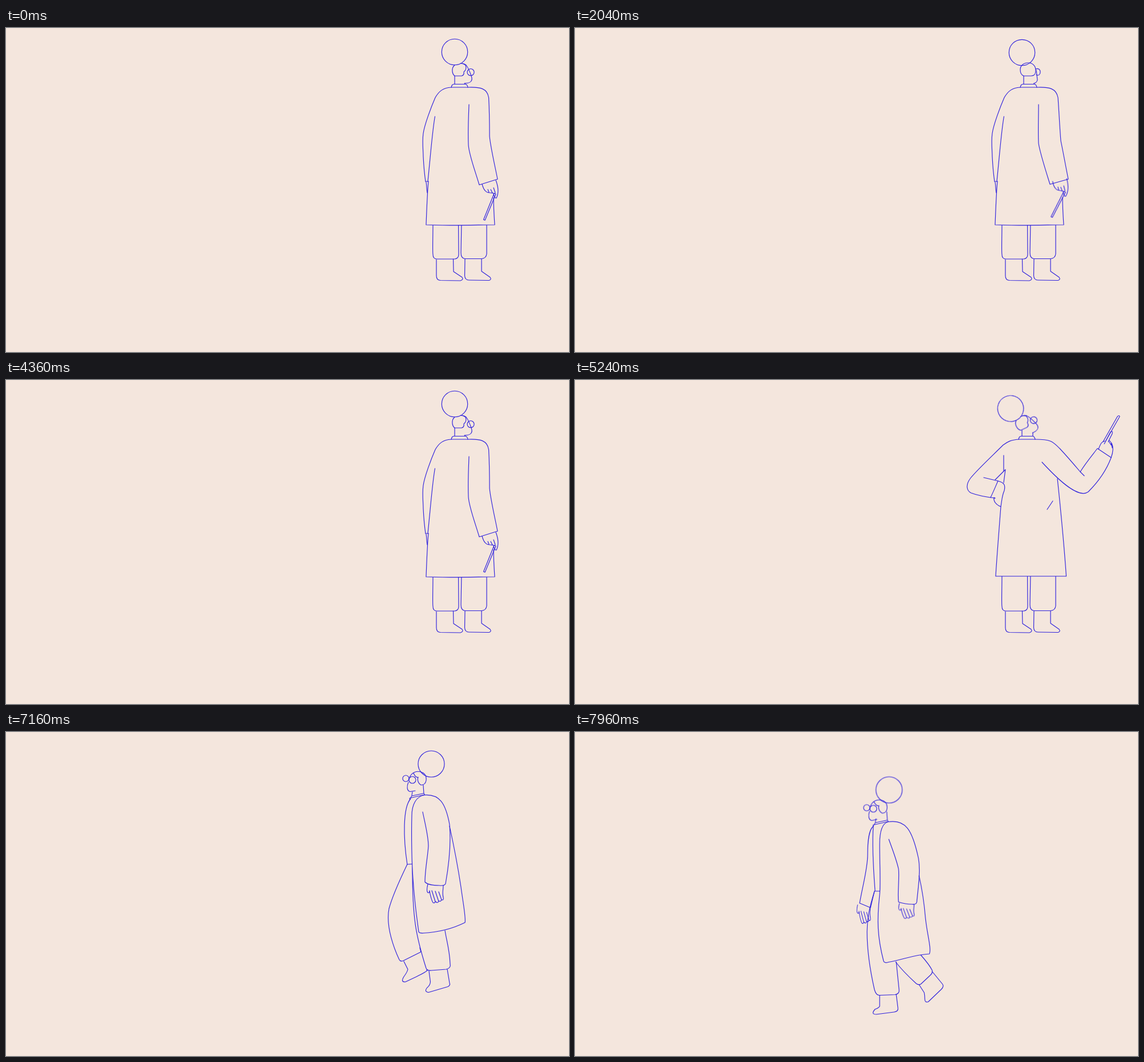
An HTML page without scripts for the animation above (8000 ms loop, 985 by 568 pixels).

```html
<!DOCTYPE html>
<html lang="en">
<head>
<meta charset="utf-8">
<title>Lecturer with a pointer</title>
<style>
html, body { margin: 0; width: 100%; height: 100%; overflow: hidden; background: #f4e6dd; }
svg { display: block; width: 985px; height: 568px; fill: none; stroke: #2f22dc; stroke-width: 1.15; stroke-linejoin: round; stroke-linecap: round; }
.solid { fill: #f4e6dd; }

/* one percent is one 80 ms drawing */
.move { animation: 8s steps(5) infinite; }
.walk { animation: 8s steps(6) infinite; }
.stride { animation: 8s steps(3) infinite; }
.swap { animation: 8s step-end infinite; }

/* visibility switches */
#back { animation-name: back-on; }
#side { animation-name: side-on; }
#look { animation-name: look-on; }
#away { animation-name: away-on; }
#left { animation-name: left-on; }
#low { animation-name: low-on; }
#high { animation-name: high-on; }
#pocket { animation-name: pocket-on; }
#armpit { animation-name: armpit-on; }
#knuckles { animation-name: knuckles-on; }
#far-arm { animation-name: far-arm-on; }
@keyframes back-on { 0% { opacity: 1 } 89.5%, 100% { opacity: 0 } }
@keyframes side-on { 0% { opacity: 0 } 89.5%, 100% { opacity: 1 } }
@keyframes look-on { 0%, 38.5% { opacity: 1 } 3.5%, 74.5%, 100% { opacity: 0 } }
@keyframes away-on { 0%, 38.5%, 100% { opacity: 0 } 3.5% { opacity: 1 } }
@keyframes left-on { 0% { opacity: 0 } 74.5%, 100% { opacity: 1 } }
@keyframes low-on { 0% { opacity: 1 } 60.5%, 100% { opacity: 0 } }
@keyframes high-on { 0% { opacity: 0 } 60.5%, 100% { opacity: 1 } }
@keyframes pocket-on { 0% { opacity: 0 } 62.5%, 100% { opacity: 1 } }
@keyframes armpit-on { 0%, 73.5%, 100% { opacity: 0 } 62.5% { opacity: 1 } }
@keyframes knuckles-on { 0% { opacity: 0 } 75.5%, 100% { opacity: 1 } }
@keyframes far-arm-on { 0% { opacity: 0 } 96.5%, 100% { opacity: 1 } }

/* figure seen from behind */
#turn { animation-name: turn; }
@keyframes turn {
  0%, 84.5% { transform: none }
  89.5%, 100% { transform: translate(-40px, 11px) }
}
#trouser-l { animation-name: trouser-l; }
@keyframes trouser-l {
  0%, 84.4% { d: path("M747 340C747 370 746 390 747 397Q747 405 754 405L785 405Q792 404 792 397L791.5 340") }
  84.5%, 100% { d: path("M744 346C746 372 748 392 754 399Q757 402 764 401L790 397.5Q798 396 797.5 388L792 342") }
}
#trouser-r { animation-name: trouser-r; }
@keyframes trouser-r {
  0%, 84.4% { d: path("M797 340L796 394Q796 404 803 404.5L832 404.5Q840 404 841 396L841 338") }
  84.5%, 100% { d: path("M799 340L798 393Q799 402 807 405L832 408Q840 407 842 402L847 338") }
}
#boot-l { animation-name: boot-l; }
@keyframes boot-l {
  0%, 84.4% { d: path("M753 406L753 434Q753 442 760 442.5L795 443Q801 441 798 437L783 427L782.5 405") }
  84.5%, 100% { d: path("M763 401L766 424Q770 441 777 443L792 443Q799 442 797 437L793 422L792 398") }
}
#boot-r { animation-name: boot-r; }
@keyframes boot-r {
  0%, 84.4% { d: path("M803 405L802.5 434Q803 442 810 442L845 442.5Q850 441 847 437L832 426.5L832 405") }
  84.5%, 100% { d: path("M806 406L804 434Q803 442 808 441.5L841 442Q846 441 843 437L833 427L835 408") }
}
#coat { animation-name: coat; }
@keyframes coat {
  0%, 55.5% { d: path("M739 269C737 290 736 320 735 345C770 347 830 345 855 345C854 330 853 310 853 297") }
  65.5%, 72.5% { d: path("M745 222C742 262 738 310 736 344C770 344 820 344 859.5 344C855 280 850 230 844 173") }
  75.5%, 100% { d: path("M742 240C740 270 731 325 738 348C780 348 815 342 858 340.5C861 320 845 235 836 173") }
}
#arm-l { animation-name: arm-l; }
@keyframes arm-l {
  0%, 55.5% { d: path("M779 104C765 105 758 110 751 122C744 138 732 170 730 185C728 200 730 215 730 225C731 245 732 255 734 269") }
  65.5%, 72.5% { d: path("M776 104C763 105 757 108 749 114C730 133 703 158 692 172C683 184 685 194 693 198C706 203 718 205 735 207") }
  75.5%, 100% { d: path("M768 108C750 110 743 115 737 122C718 145 706 170 700 186C696 198 701 204 706 209C715 217 720 221 727 221") }
}
#inner-l { animation-name: inner-l; }
@keyframes inner-l {
  0%, 55.5% { d: path("M750.5 155C746 180 744 210 738 269") }
  65.5%, 72.5% { d: path("M750 132C750 140 750 150 750 160") }
  75.5%, 100% { d: path("M753 155C748 165 743 177 739 190") }
}
#cuff-l { animation-name: cuff-l; }
@keyframes cuff-l {
  0%, 55.5% { d: path("M739 269C738 269 737 269 737 269C736 269 735 269 734 269") }
  65.5%, 72.5% { d: path("M715 171C723 173 732 175 740 177C736 186 732 196 727 206") }
  75.5%, 100% { d: path("M740 187C747 193 747 199 745 206C740 216 733 221 722 221") }
}
#hand-l { animation-name: hand-l; }
@keyframes hand-l {
  0%, 55.5% { d: path("M735 270C736 276 736 283 737 289C737 289 737 289 737 289C737 289 737 289 737 289C737 289 737 289 737 289") }
  65.5%, 72.5% { d: path("M740 177C752 180 753 185 751 194C747 203 747 210 745 222C737 219 732 213 733 206C733 206 734 207 735 207") }
  75.5%, 100% { d: path("M746 194C750 206 758 212 756 221C752 226 756 232 749 237C742 239 740 243 735 241C731 237 729 231 727 221") }
}
#arm-r { animation-name: arm-r; }
@keyframes arm-r {
  0%, 4.5%, 11.5%, 18.5%, 23.5%, 30.5%, 55.5% { d: path("M808 104C830 103 842 106 844.5 122C846 150 846 170 846 190C848 210 854 235 860 265L828 275C820 248 810 222 809 205C808 180 809 160 810 134") }
  6.5%, 13.5%, 25.5% { d: path("M808 104C830 103 842 106 845 122C847 150 848 175 850 198C854 217 858 240 863 265L831 274C822 245 813 217 811 202C810 180 811 160 811 134") }
  8.5%, 15.5%, 27.5% { d: path("M808 104C830 103 841 106 847 122C852 150 856 170 860 190C868 212 879 236 888 257L858 270C845 245 825 220 820 203C816 180 813 160 812 134") }
  60.5%, 89.5%, 100% { d: path("M807 104C832 104 840 108 847 124C856 145 865 165 872 180C884 192 897 200 909 208L893 236C878 228 862 218 850 208C838 195 820 170 814 140") }
  65.5%, 72.5% { d: path("M805 104C833 104 836 108 848 120C862 135 873 148 884 161C893 146 904 133 914 120L938 136C928 163 912 182 898 196C882 208 850 180 817 144") }
  75.5%, 84.5% { d: path("M795 105C822 102 826 107 836 116C850 130 862 141 872 151C885 139 900 127 912 117.5L931 137C918 155 903 170 892 183C874 206 848 192 825 157") }
}
#crease { animation-name: crease; }
@keyframes crease {
  0%, 60.5%, 89.5%, 100% { d: path("M872 180L876 184") }
  65.5%, 72.5% { d: path("M884 161L891 168") }
  75.5%, 84.5% { d: path("M872 151L878 158") }
}
#low-hand { animation-name: low-hand; transform-origin: 846px 270px; }
@keyframes low-hand {
  0%, 4.5%, 11.5%, 18.5%, 23.5%, 30.5%, 55.5% { transform: none }
  6.5%, 13.5%, 25.5% { transform: translate(3px, -4px) rotate(5deg) }
  8.5%, 15.5%, 27.5% { transform: translate(28px, -6px) rotate(-10deg) }
  60.5%, 100% { transform: translate(55px, -48px) rotate(-40deg) }
}
#high-hand { animation-name: high-hand; transform-origin: 926px 128px; }
@keyframes high-hand {
  0%, 60.5%, 89.5%, 100% { transform: translate(-25px, 94px) rotate(90deg) }
  65.5%, 72.5% { transform: none }
  75.5%, 84.5% { transform: translate(-3.5px, .5px) }
}
#collar { animation-name: collar; }
@keyframes collar {
  0%, 55.5% { d: path("M779 104L780 101Q781 98.5 784 98.5L804 98.5Q807 99 808 104Z") }
  65.5%, 72.5% { d: path("M776 104L777 101Q778 98.5 781 98.5L801 98.5Q804 99 805 104Z") }
  75.5%, 100% { d: path("M767 108L768 106Q768 103.5 771 103.5L791 101Q794 101 796 105Z") }
}
#neck { animation-name: neck; }
@keyframes neck {
  0%, 55.5% { d: path("M785 84L785 98M803 97L803 98") }
  65.5%, 72.5% { d: path("M782 88L782 98M801 92L801 98") }
  75.5%, 100% { d: path("M787 87L789 101M769 97L770 103") }
}
#head { animation-name: head; transform-origin: 793px 92px; }
@keyframes head {
  0%, 55.5% { transform: none }
  65.5%, 100% { transform: translate(-2.5px, 0) rotate(-25deg) }
}

/* figure walking to the left */
#approach { animation: approach 8s steps(4) infinite; }
@keyframes approach {
  0%, 89.5% { transform: translate(58px, -18px) }
  93.5%, 100% { transform: none }
}
#torso { animation-name: torso; }
@keyframes torso {
  0%, 93.5% { d: path("M650 135C636 150 637 205 644 250L652 249.5") }
  99.5%, 100% { d: path("M522 164C520 190 522 240 525 279L534 279") }
}
#robe { animation-name: robe; }
@keyframes robe {
  0%, 93.5% { d: path("M675 128.5C660 130 652 145 652 165C651 200 652 250 654 275C657 320 661 345 664 368Q665 371 672 370.5C700 369 725 362 745 352C747 345 742 320 738 290C732 250 725 215 718 183") }
  99.5%, 100% { d: path("M548 157.5C537 160 533 175 533 197C533 230 535 270 533 285C528 330 529 360 540 402Q542 406 548 403.5C575 399 590 391 620 389C624 380 616 355 613 325C611 300 607 275 602 252") }
}
#near-arm { animation-name: near-arm; }
@keyframes near-arm {
  0%, 93.5% { d: path("M675 128.5C700 127 711 142 718 180C721 215 717 250 711 284Q709 288 700 287C690 287 680 286 675 281C675 260 680 235 681 218C681 200 675 178 671 158") }
  99.5%, 100% { d: path("M548 157.5C578 153 590 170 601 222C605 245 600 275 598 298Q597 303 590 302C582 302 572 300 566 298C564 280 568 255 566 240C562 222 555 205 549 188") }
}
#near-hand { animation-name: near-hand; transform-origin: 693px 286px; }
@keyframes near-hand {
  0%, 93.5% { transform: none }
  99.5%, 100% { transform: translate(-113px, 15px) scale(.95, .82) }
}
#far-swing { animation-name: far-swing; }
@keyframes far-swing {
  0%, 93.5% { transform: translate(137px, -28px) }
  99.5%, 100% { transform: none }
}
#far-leg { animation-name: far-leg; }
@keyframes far-leg {
  0%, 93.5% { d: path("M644 250C632 275 618 305 612 328C606 360 622 400 630 417Q632 421 637 419L667 404Q668 403 667 400L666 396") }
  96.5% { d: path("M584 265C572 295 563 318 558 345C551 385 538 425 530 450Q529 458 535 459L563 464Q569 465 571 458L600 390") }
  99.5%, 100% { d: path("M524 279C516 305 511 325 511 350C511 390 519 430 524 452Q527 462 533 461.5L560 460.5Q568 459 567 452L562 403") }
}
#far-boot { animation-name: far-boot; }
@keyframes far-boot {
  0%, 93.5% { d: path("M638 420L645 434Q644 439 638 447Q632 457 641 456L660 447Q678 438 679 436L678 435") }
  96.5% { d: path("M536 459L532 476Q528 481 523 484Q515 492 525 494L557 492Q565 491 564 485L562 463") }
  99.5%, 100% { d: path("M533 462L533 481Q531 484 525 486Q517 495 527 495L558 491Q566 490 565 484L562 460") }
}
#near-leg { animation-name: near-leg; }
@keyframes near-leg {
  0%, 93.5% { d: path("M653 255C653 345 659 375 677 432Q679 437 686 436L712 434Q721 432 719 424C718 400 713 385 710 366") }
  96.5% { d: path("M604 372C620 395 632 415 642 433Q645 438 651 436L671 429Q679 426 676 418C672 402 664 390 657 378") }
  99.5%, 100% { d: path("M561 403C570 415 585 430 597 441Q601 444 605 442L621 427Q626 423 625 418C620 408 613 400 605 391") }
}
#near-boot { animation-name: near-boot; }
@keyframes near-boot {
  0%, 93.5% { d: path("M682 437L684.5 456Q684 462 679 466Q673 473 681 474.5L715 464.5Q720 462 718 458L714 434") }
  96.5% { d: path("M648 437L656 455Q656 461 654 467Q652 474 659 474L687 460Q692 457 690 453L674 426") }
  99.5%, 100% { d: path("M602 443L611 457Q612 462 612 468Q612 475 618 473L641 451Q646 446 643 442L625 420") }
}
#bun { animation-name: bun; }
@keyframes bun {
  0%, 93.5% { transform: none }
  99.5%, 100% { transform: translate(-136.5px, 27.5px) }
}
#side-head { animation-name: side-head; transform-origin: 653px 102px; }
@keyframes side-head {
  0%, 93.5% { transform: none }
  99.5%, 100% { transform: translate(-131px, 32.5px) rotate(-4deg) }
}
#side-collar { animation-name: side-collar; }
@keyframes side-collar {
  0%, 93.5% { transform: none }
  99.5%, 100% { transform: translate(-126.5px, 29px) }
}
</style>
</head>
<body>
<svg viewBox="0 0 985 568">
  <defs>
    <path id="fingers" d="M680 285C678 293 678 299 681 300Q683 300 683 296C684 304 687 314 689 317Q692 319 693 315L687 296M693 315Q697 319 699 315L693 297M699 314Q703 316 704 312L699 298M704 312Q708 314 707 308C705 300 707 295 707 287"/>
  </defs>

  <g id="back" class="swap"><g id="turn" class="move">
    <path id="boot-l" class="move"/>
    <path id="boot-r" class="move"/>
    <path id="trouser-l" class="move"/>
    <path id="trouser-r" class="move"/>
    <path id="coat" class="move solid"/>
    <path id="pocket" class="swap" d="M826 227L836 212"/>
    <path id="arm-l" class="move"/>
    <path id="inner-l" class="move"/>
    <path id="hand-l" class="move"/>
    <path id="cuff-l" class="move"/>
    <path id="armpit" class="swap" d="M735 175L753 157L750 180"/>
    <path id="knuckles" class="swap" d="M736 231L741 240M741 230L747 238M745 226L753 234"/>
    <path id="arm-r" class="move solid"/>
    <g id="low" class="swap"><g id="low-hand" class="move">
      <path d="M854 290L835.5 336L838 337L857 291Z"/>
      <path d="M833 274C836 285 840 289 848 289L855 290M857 267C862 280 862 290 858 298Q855 299 853 291M843 283L845 288M848 283L851 289M853 280L856 289"/>
    </g></g>
    <g id="high" class="swap">
      <path id="crease" class="move"/>
      <g id="high-hand" class="move">
        <path d="M924 108L949 64Q952 61 953 64L929 106"/>
        <path d="M916 121C920 110 922 108 927 107M926 112L937 91Q941 88 940 94L933 108M938 136C942 125 942 117 939 111L935 106M934 108L938 114M938 111L940 119"/>
      </g>
    </g>
    <path id="neck" class="move"/>
    <path id="collar" class="move"/>
    <g id="look" class="swap"><g id="head" class="move">
      <circle cx="785" cy="42" r="22.7"/>
      <path d="M785 65C779 70 780 80 785 84L797 84Q802 83 801 77C806 73 805 68 804 65C800 62 797 62 795 62"/>
      <path d="M798 62Q803 63 805 65C809 70 812 78 814 84C817 92 814 97 802 97"/>
      <circle cx="813" cy="77.5" r="6"/>
    </g></g>
    <g id="away" class="swap">
      <circle cx="782" cy="43" r="22.7"/>
      <path d="M779 73C779 65 786 61 793 61C801 61 806 67 806 74C806 82 803 84 798 84L785 84C780 82 779 78 779 73Z"/>
      <path d="M807 74L809 91Q808 96 803 97M806 72C811 70 814 73 814 77C814 82 811 84 807 82"/>
    </g>
    <g id="left" class="swap">
      <circle cx="787.5" cy="43.5" r="22.7"/>
      <path d="M768 66C765 70 766 76 769 79Q770 85 776 85.5L787 86C791 80 791 70 786 67C780 63 773 62 768 66"/>
      <path d="M768 66C762 70 759 76 757 84C753 92 754 98 762 98L769 97"/>
      <circle cx="757.5" cy="79" r="6"/>
    </g>
  </g></g>

  <g id="side" class="swap"><g id="approach">
    <g id="far-arm" class="swap"><g id="far-swing" class="walk">
      <path d="M522 165C514 172 512 190 512 215C512 240 503 270 498 300L517 308C520 295 522 287 524 279"/>
      <use href="#fingers" transform="translate(-70 18) scale(.83 1)"/>
    </g></g>
    <path id="far-boot" class="stride"/>
    <path id="far-leg" class="stride"/>
    <path id="near-boot" class="stride"/>
    <path id="near-leg" class="stride"/>
    <path id="torso" class="walk"/>
    <path id="robe" class="walk solid"/>
    <path id="near-arm" class="walk"/>
    <g id="near-hand" class="walk"><use href="#fingers"/></g>
    <path id="side-collar" class="walk" d="M648 136L652 130L673 125.5L675 128.5M648 134L674 128M653 123L652 129M672 111L673 126"/>
    <circle id="bun" class="walk" cx="686" cy="74" r="23"/>
    <g id="side-head" class="walk">
      <path d="M648 98C652 88 661 86 668 88C675 90 678 95 677 103C676 109 673 111 668 111C664 109 661 103 663 97M655 90C658 98 661 97 663 98"/>
      <path d="M646 106C643 113 643 121 649 122.5L658 121M647 100L647 101"/>
      <circle cx="653" cy="102" r="6"/>
      <circle cx="641.5" cy="99.5" r="5.5"/>
    </g>
  </g></g>
</svg>
</body>
</html>
```
